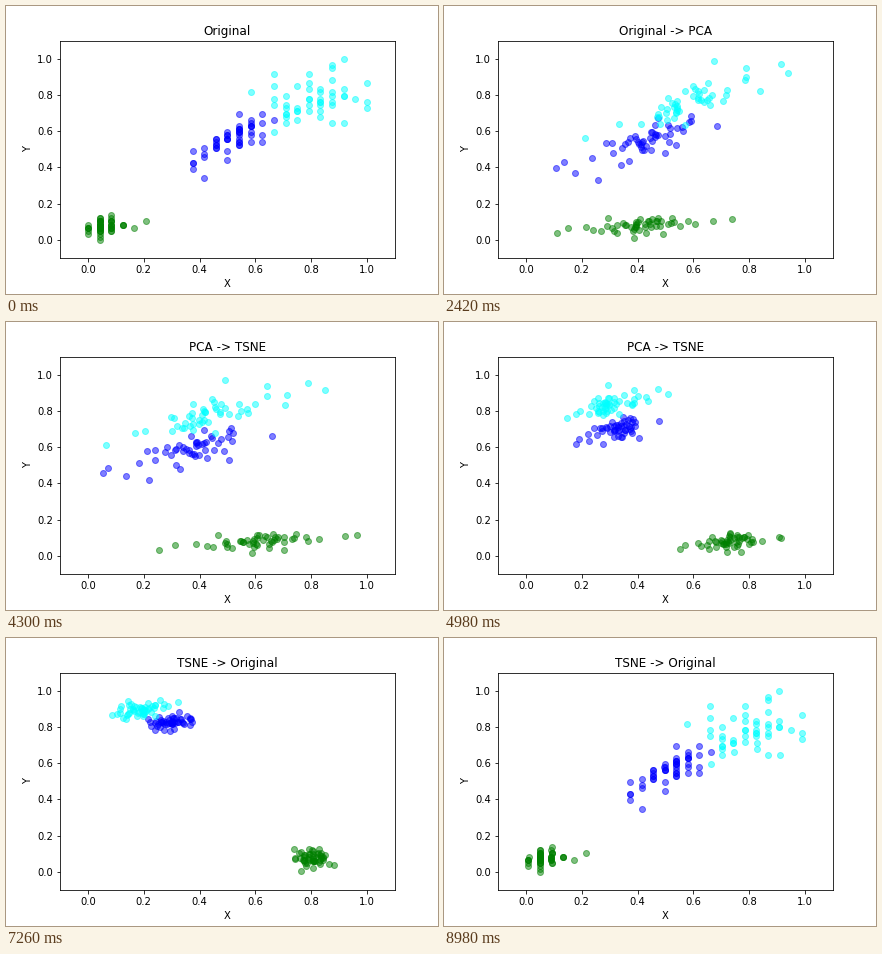
Write a matplotlib script that moves like this. It is 432 px wide and 288 px high and loops after 9 s.

```python
import matplotlib.pyplot as plt
import numpy as np
from matplotlib.animation import FuncAnimation

STEPS, HOLD = 100, 50
VIEWS = ["Original", "PCA", "TSNE"]
COUNT = 50
rng = np.random.default_rng(11)


def bell(n=COUNT):
    """Evenly filled bell curve in random order."""
    p = (np.arange(n) + 0.5) / n
    return rng.permutation(0.53 * np.log(p / (1 - p)))


def petals(n, length, width, corr):
    """Correlated petal sizes in whole mm; widths are skewed to the right."""
    mid, sd, low, high = length
    z = bell(n)
    mm = np.clip(np.round(mid + sd * z), low, high)
    mid, sd, low, high = width
    z = corr * z + np.sqrt(1 - corr**2) * bell(n)
    return np.clip(np.round(mid * np.exp(sd * z)), low, high), mm


def layouts(length, width, corr, pca, tsne, keys):
    """Positions in the three views; keys are outliers (width, length, x)."""
    kw, kl, kx = np.array(keys, float).T
    w, n = petals(COUNT - len(keys), length, width, corr)
    w = (np.r_[w, kw] - 1) / 24
    n = (np.r_[n, kl] - 10) / 59
    d = n - n.mean()

    # First component follows petal size, second mostly spreads
    mid, slope, sd, base, tilt = pca
    trend = mid + slope * d
    x = np.clip(trend + sd * bell(), 0.02, 0.95)
    x[-len(keys):] = kx
    y = 0.72 * n + 0.122 * w + base + tilt * d + 0.07 * (x - trend)

    # Compact clouds that keep some of the order of the second view
    cx, cy, by_size, by_x, lean, rise, noise, box = tsne
    tx = np.clip(cx + by_size * d + by_x * (x - mid) + noise * bell(), *box[:2])
    ty = np.clip(cy + lean * (tx - cx) + rise * d + 0.024 * bell(), *box[2:])
    return np.array([np.c_[w, n], np.c_[x, np.clip(y, 0, 1)], np.c_[tx, ty]])


GROUPS = {
    "green": layouts(
        length=(14.7, 1.5, 11, 19), width=(2.2, 0.36, 1, 5), corr=0.3,
        pca=(0.554, 1.04, 0.15, 0.018, 0.136),
        tsne=(0.915, 0.077, 0, -0.18, 0, 0.7, 0.028, (0.835, 1, 0, 0.13)),
        keys=[(3, 13, 0.125), (4, 15, 0.989), (2, 10, 0.531), (6, 16, 0.554)]),
    "blue": layouts(
        length=(43.4, 4, 35, 51), width=(13.5, 0.13, 10, 18), corr=0.78,
        pca=(0.388, 1.44, 0.105, 0.075, 0.224),
        tsne=(0.265, 0.868, -0.4, -0.16, 0.22, 0, 0.032,
              (0.15, 0.365, 0.805, 0.96)),
        keys=[(10, 35, 0), (10, 33, 0.095), (11, 30, 0.195), (14, 47, 0.741)]),
    "cyan": layouts(
        length=(55.2, 4.7, 48, 67), width=(20.3, 0.135, 14, 25), corr=0.3,
        pca=(0.502, 1.457, 0.11, 0.106, 0.285),
        tsne=(0.095, 0.912, -0.5, -0.05, 0.5, 0, 0.025, (0, 0.29, 0.848, 1)),
        keys=[(17, 45, 0.028), (20, 64, 1), (22, 67, 0.928), (23, 69, 0.577)]),
}

fig, ax = plt.subplots(figsize=(6, 4), dpi=72)
fig.subplots_adjust(bottom=0.125)
ax.set(xlim=(-0.1, 1.1), ylim=(-0.1, 1.1), xlabel="X", ylabel="Y")
title = ax.set_title(VIEWS[0])
dots = [ax.scatter(*p[0].T, color=color, alpha=0.5) for color, p in GROUPS.items()]


def update(frame):
    view, step = divmod(frame, HOLD + STEPS)
    after = (view + 1) % len(VIEWS)
    moving = step >= HOLD
    t = (step - HOLD) / STEPS if moving else 0
    title.set_text(f"{VIEWS[view]} -> {VIEWS[after]}" if moving else VIEWS[view])
    for dot, p in zip(dots, GROUPS.values()):
        dot.set_offsets((1 - t) * p[view] + t * p[after])
    return [title, *dots]


anim = FuncAnimation(fig, update, frames=len(VIEWS) * (HOLD + STEPS),
                     interval=20, repeat=True, repeat_delay=0)
plt.show()
```
